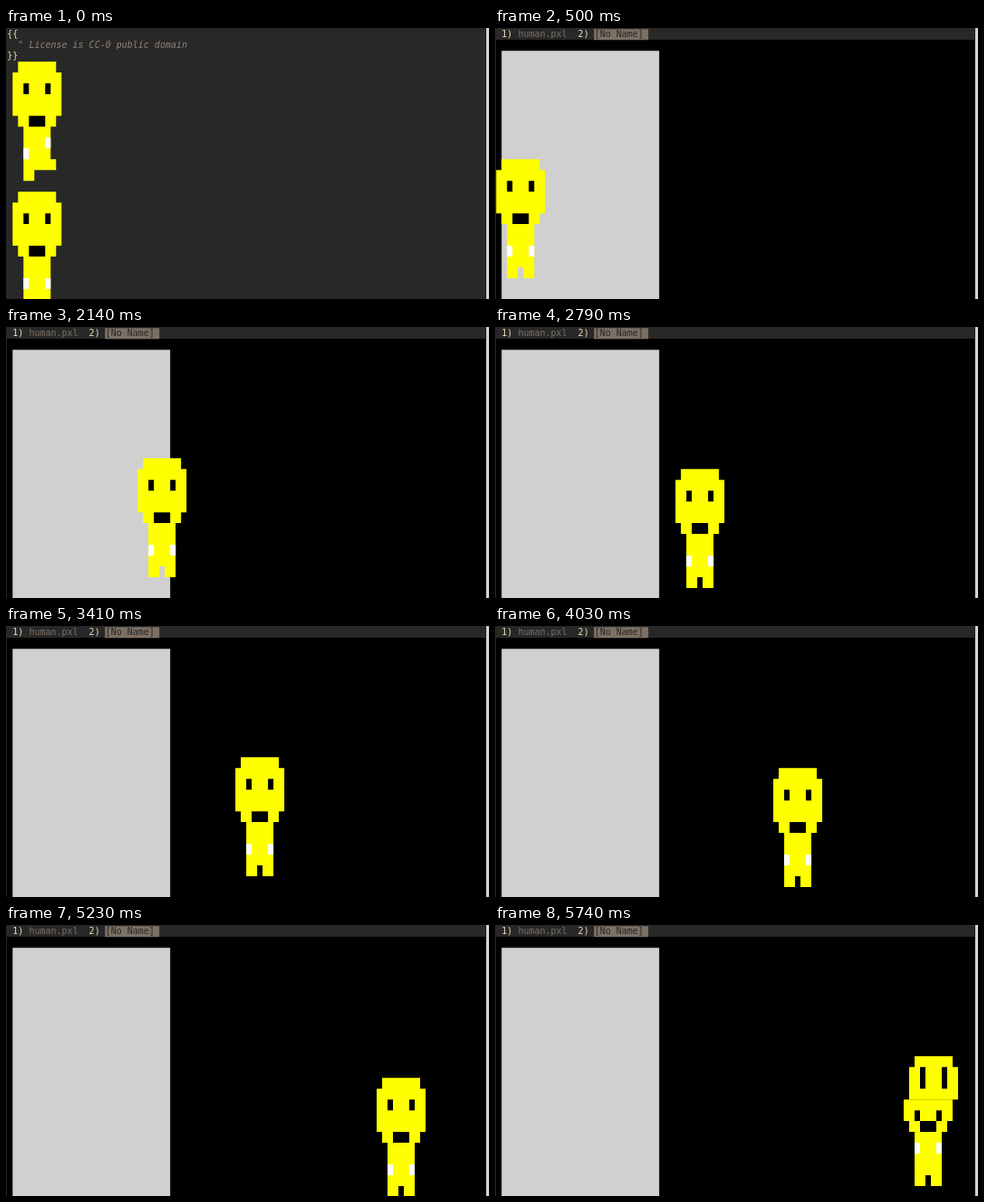
Animation of 533x300 px, one loop 5790 ms. Source, as an HTML page with a canvas:

```html
<!DOCTYPE html>
<html lang="en">
<head>
<meta charset="utf-8">
<title>Walking pixel human</title>
<style>
html, body { margin: 0; width: 100%; height: 100%; overflow: hidden; background: #282828; }
canvas { position: absolute; left: 0; top: 0; }
pre { position: absolute; left: 1px; top: 1px; margin: 0; color: #ebdbb2;
  font: 10px/12px "DejaVu Sans Mono", monospace; transform: translate(.3px, .3px); }
i { color: #928374; }
.tab { color: #7c6f64; }
.current { color: #282828; }
</style>
</head>
<body>
<canvas width="533" height="300"></canvas>
<pre id="file">{{
  <i>" License is CC-0 public domain</i>
}}</pre>
<pre id="tabs"> 1) <span class="tab">human.pxl</span>  2) <span class="current">[No Name] </span></pre>
<script>
const LOOP = 5790, OPEN = 350, WALK = 457, STEP = 69.5, LAST_COL = 76;
// text grid of the terminal
const LEFT = 1.3, TOP = 1.3, CELL_W = 5.9963, CELL_H = 11.99;
const YELLOW = '#ffff00', BLACK = '#000', WHITE = '#fff';

const ctx = document.querySelector('canvas').getContext('2d');
const file = document.getElementById('file'), tabs = document.getElementById('tabs');

function rect(color, x, y, w, h) {
  ctx.fillStyle = color;
  ctx.fillRect(x, y, w, h);
}

// Fills boxes given in grid cells as one shape, so that no seams show.
function cells(color, col, row, ...boxes) {
  ctx.fillStyle = color;
  ctx.beginPath();
  for (const [x, y, w = 1, h = 1] of boxes) {
    ctx.rect(LEFT + (col + x) * CELL_W, TOP + (row + y) * CELL_H, w * CELL_W, h * CELL_H);
  }
  ctx.fill();
}

function human(col, row, { eyes = 2, leftArm = 8, rightArm = 8, kick = false } = {}) {
  const rightLeg = kick ? [2, 9, 6] : [5, 10, 2];
  cells(YELLOW, col, row, [1, 0, 7, 6], [0, 1, 9, 4], [2, 6, 5, 4], [2, 10, 2], rightLeg);
  cells(BLACK, col, row, [2, eyes], [6, eyes], [3, 5, 3]);
  cells(WHITE, col, row, [2, leftArm], [6, rightArm]);
}

// The last step is caught halfway through the redraw.
function halfRedrawn(col, row) {
  human(col - 1, row + 1, { eyes: 4, leftArm: 7, rightArm: 7 });
  cells(BLACK, col, row, [-1, 0, 10, 4]);
  cells(YELLOW, col, row, [1, 0, 7, 4], [0, 1, 9, 3]);
  cells(BLACK, col, row, [2, 1, 1, 2], [6, 1, 1, 2]);
}

function walk(t) {
  const col = Math.max(0, Math.floor((t - WALK) / STEP));
  const row = 14 - Math.abs(col % 6 - 2) - 0;
  if (col < LAST_COL) human(col, row);
  else halfRedrawn(LAST_COL, row);
}

function draw(t) {
  const opened = t >= OPEN;
  file.hidden = opened;
  tabs.hidden = !opened;
  rect('#282828', 0, 0, 533, 300);
  if (opened) {
    rect(BLACK, 1, 13, 528, 287);
    cells('#7c6f64', 18, 0, [0, 0, 10]);
    cells('#d0d0d0', 1, 2, [0, 0, 29, 23]);
    walk(t);
  } else {
    human(1, 3, { rightArm: 7, kick: true });
    human(1, 15);
  }
  rect('#d6d3d0', 530, 0, 3, 300);
}

const start = performance.now();
function tick() {
  draw((performance.now() - start) % LOOP);
  requestAnimationFrame(tick);
}
tick();
</script>
</body>
</html>
```
